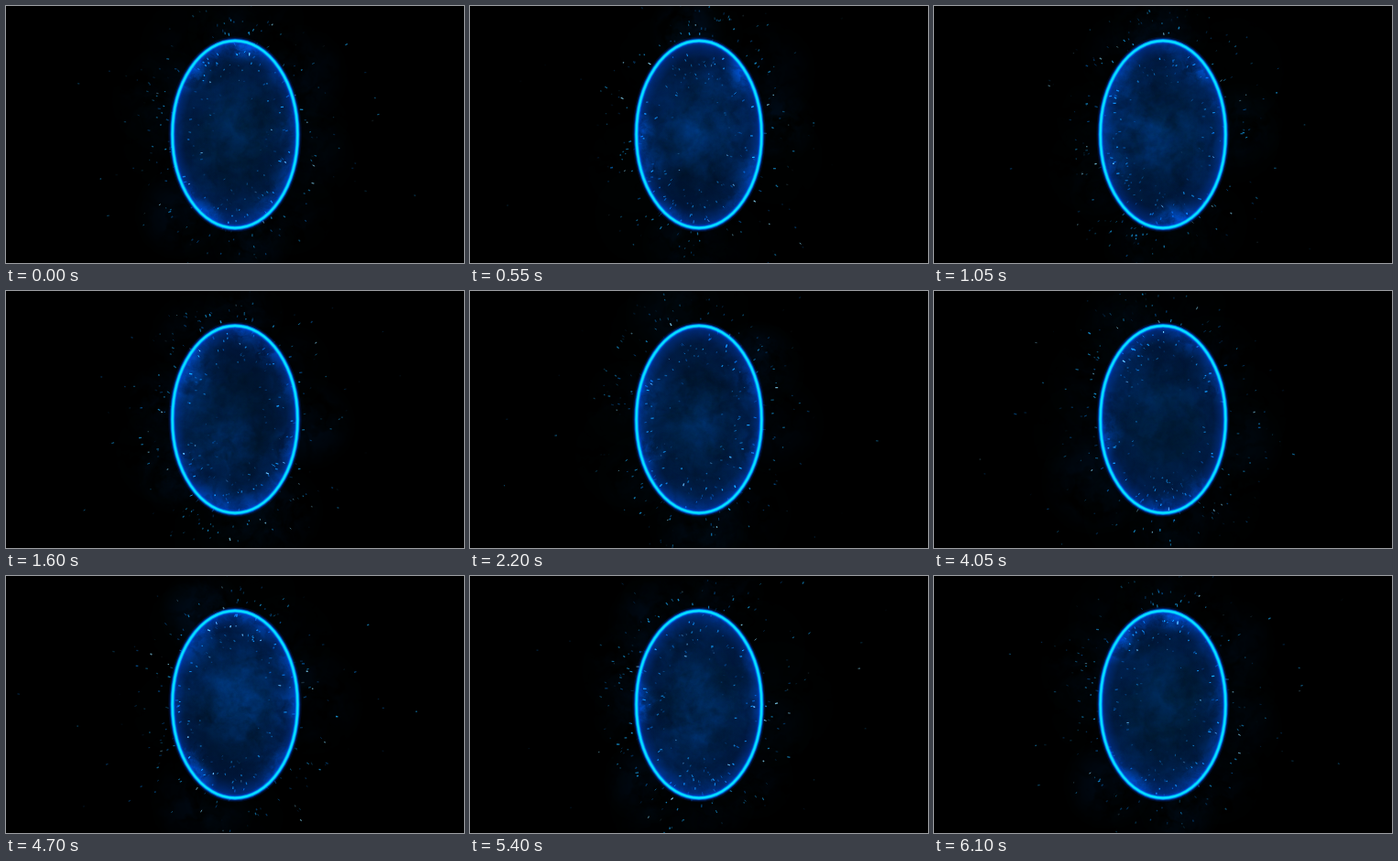
Recreate the animation shown at these times as an HTML page with a canvas. Size 500 by 281 pixels, loop 6150 ms.

```html
<!DOCTYPE html>
<html lang="en">
<head>
<meta charset="utf-8">
<title>Blue portal</title>
<style>
html, body { margin: 0; width: 100%; height: 100%; overflow: hidden; background: #000; }
canvas { display: block; width: 100vw; height: 100vh; }
</style>
</head>
<body>
<canvas id="stage" width="500" height="281"></canvas>
<script>
const ctx = document.getElementById('stage').getContext('2d');
const W = 500, H = 281, LOOP = 6150, STEP = 50;
const CX = 250, CY = 140.4, RX = 68.3, RY = 102.3, TAU = Math.PI * 2;

function seeded(seed) {
  let s = seed | 0;
  return () => {
    s = (s + 0x6D2B79F5) | 0;
    let n = Math.imul(s ^ (s >>> 15), 1 | s);
    n = (n + Math.imul(n ^ (n >>> 7), 61 | n)) ^ n;
    return ((n ^ (n >>> 14)) >>> 0) / 4294967296;
  };
}

function makeNoise(seed) {
  const rnd = seeded(seed), grid = Array.from({ length: 4096 }, rnd);
  const at = (x, y) => grid[(y & 63) * 64 + (x & 63)];
  const ease = v => v * v * (3 - 2 * v);
  const smooth = (x, y) => {
    const i = Math.floor(x), j = Math.floor(y), u = ease(x - i), v = ease(y - j);
    const top = at(i, j) * (1 - u) + at(i + 1, j) * u;
    const low = at(i, j + 1) * (1 - u) + at(i + 1, j + 1) * u;
    return top * (1 - v) + low * v;
  };
  return (x, y) => {
    let sum = 0, amp = 0.5;
    for (let o = 0; o < 5; o++) {
      sum += amp * smooth(x, y);
      x = x * 2.03 + 7; y = y * 2.03 + 3; amp /= 2;
    }
    return sum;
  };
}

// A soft round puff of smoke with warped, wispy edges
function makePuff(seed) {
  const size = 128, c = document.createElement('canvas');
  c.width = c.height = size;
  const g = c.getContext('2d'), img = g.createImageData(size, size), noise = makeNoise(seed);
  for (let y = 0; y < size; y++) {
    for (let x = 0; x < size; x++) {
      const r = Math.hypot(x - 64, y - 64) / 64;
      const u = x / 30, v = y / 30;
      const n = noise(u + 2.2 * noise(u + 9, v), v + 2.2 * noise(u, v + 17));
      const a = Math.max(0, 1 - r * r) ** 1.3 * Math.min(1, Math.max(0, (n - 0.3) * 2.6));
      const k = (y * size + x) * 4;
      img.data[k + 1] = 76;
      img.data[k + 2] = 180;
      img.data[k + 3] = 255 * a;
    }
  }
  g.putImageData(img, 0, 0);
  return c;
}

const puffs = [11, 23, 37, 51].map(makePuff);

// Position in a life that repeats a whole number of times per loop
function life(id, cycles, t) {
  const offset = seeded(id * 131 + 5)();
  const pos = t / LOOP * cycles + offset;
  const turn = Math.floor(pos) % cycles;
  return { p: pos % 1, rnd: seeded(id * 7919 + turn * 104729) };
}

function drawPuff(i, x, y, size, angle, alpha) {
  ctx.save();
  ctx.translate(x, y);
  ctx.rotate(angle);
  ctx.globalAlpha = alpha;
  ctx.drawImage(puffs[i % puffs.length], -size, -size, size * 2, size * 2);
  ctx.restore();
}

function smoke(first, count, cycles, t, reach, size, alpha) {
  for (let i = 0; i < count; i++) {
    const { p, rnd } = life(first + i, cycles, t);
    const a = (i + rnd()) / count * TAU;
    const d = reach[0] + (reach[1] - reach[0]) * Math.sqrt(rnd()) + (p - 0.5) * 0.1;
    const r = size * (0.8 + rnd() * 0.4) * (0.9 + p * 0.2);
    const spin = rnd() * TAU + (p - 0.5) * (rnd() - 0.5) * 1.2;
    const fade = Math.sin(Math.PI * p) ** 2 * (0.7 + 0.6 * rnd());
    drawPuff(i, CX + Math.cos(a) * RX * d, CY + Math.sin(a) * RY * d, r, spin, Math.min(1, alpha * fade));
  }
}

function oval() {
  ctx.beginPath();
  ctx.ellipse(CX, CY, RX, RY, 0, 0, TAU);
}

function interior(t) {
  ctx.save();
  oval();
  ctx.clip();
  ctx.globalCompositeOperation = 'source-over';
  ctx.fillStyle = '#000c1f';
  ctx.fillRect(0, 0, W, H);
  ctx.globalCompositeOperation = 'lighter';
  ctx.save();
  ctx.translate(CX, CY);
  ctx.scale(RX, RY);
  const rim = ctx.createRadialGradient(0, 0, 0.45, 0, 0, 1);
  rim.addColorStop(0, 'rgba(0,40,120,0)');
  rim.addColorStop(0.65, 'rgba(0,40,120,0.2)');
  rim.addColorStop(1, 'rgba(0,52,165,0.6)');
  ctx.fillStyle = rim;
  ctx.fillRect(-1, -1, 2, 2);
  ctx.restore();
  smoke(100, 16, 3, t, [0, 0.75], 58, 0.16);
  smoke(200, 14, 4, t, [0.9, 1.05], 30, 0.42);
  ctx.restore();
}

function ring() {
  const layers = [
    [9, 'rgba(0,60,190,0.16)'],
    [6.2, 'rgba(0,75,215,0.4)'],
    [4.4, 'rgba(0,120,240,0.75)'],
    [3, '#00b4fc'],
    [1.7, '#08e2ff']
  ];
  ctx.globalCompositeOperation = 'source-over';
  for (const [width, color] of layers) {
    oval();
    ctx.lineWidth = width;
    ctx.strokeStyle = color;
    ctx.stroke();
  }
}

function sparks(first, count, side, t) {
  for (let i = 0; i < count; i++) {
    const { p, rnd } = life(first + i, 4 + i % 4, t);
    const a = rnd() * TAU;
    const dir = Math.atan2(Math.sin(a) / RY, Math.cos(a) / RX) + (rnd() - 0.5) * 0.8;
    const far = rnd();
    const reach = side > 0 ? 16 + 50 * far + 130 * far ** 14 : 14 + 34 * far;
    const d = side * (2 + reach * (1 - (1 - p) ** 1.7));
    const x = CX + Math.cos(a) * RX + Math.cos(dir) * d;
    const y = CY + Math.sin(a) * RY + Math.sin(dir) * d;
    const len = (1.5 + rnd() * 2.2) * (1 - p * 0.4);
    const lean = dir + (rnd() - 0.5) * 0.4;
    const dx = Math.cos(lean) * len / 2, dy = Math.sin(lean) * len / 2;
    const glow = rnd();
    ctx.globalAlpha = Math.min(1, p * 8) * (1 - p) ** 0.7 * (0.4 + 0.6 * glow);
    ctx.strokeStyle = glow > 0.92 ? '#8adfff' : glow > 0.45 ? '#18b0ff' : '#0580ea';
    ctx.lineWidth = 0.8 + rnd() * 0.6;
    ctx.beginPath();
    ctx.moveTo(x - dx, y - dy);
    ctx.lineTo(x + dx, y + dy);
    ctx.stroke();
  }
  ctx.globalAlpha = 1;
}

function draw(t) {
  ctx.globalCompositeOperation = 'source-over';
  ctx.globalAlpha = 1;
  ctx.fillStyle = '#000';
  ctx.fillRect(0, 0, W, H);
  ctx.globalCompositeOperation = 'lighter';
  smoke(300, 12, 3, t, [0.95, 1.25], 52, 0.1);
  interior(t);
  ring();
  ctx.globalCompositeOperation = 'lighter';
  ctx.lineCap = 'butt';
  sparks(1000, 165, 1, t);
  sparks(2000, 115, -1, t);
}

let shown = -1;
function tick() {
  const t = Math.floor(performance.now() % LOOP / STEP) * STEP;
  if (t !== shown) draw(shown = t);
  requestAnimationFrame(tick);
}
tick();
</script>
</body>
</html>
```
